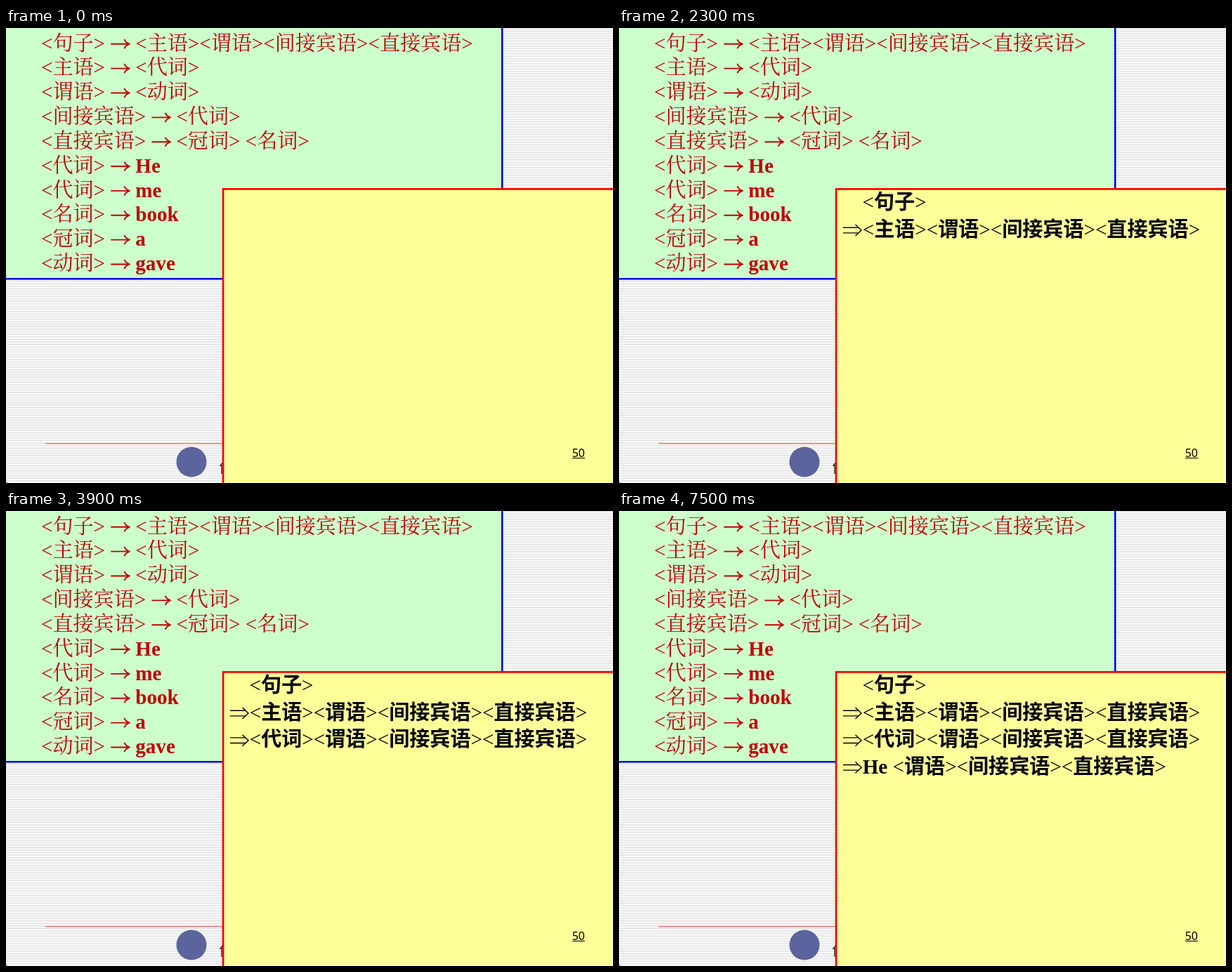
Animation, 864 px wide and 648 px high, one loop 8 s. Source, as an HTML page with a canvas:

```html
<!DOCTYPE html>
<html lang="zh">
<head>
<meta charset="utf-8">
<style>
html, body { margin: 0; width: 100%; height: 100%; overflow: hidden; }
canvas { display: block; }
</style>
</head>
<body>
<canvas width="864" height="648"></canvas>
<script>
const ctx = document.querySelector('canvas').getContext('2d');
const LOOP = 8000, STEP = 100, SIZE = 29.1, ARROW = SIZE * 0.987, SOFT = 0.15;
const SERIF = '"Liberation Serif", "Times New Roman", serif';
const SONG = '"Noto Serif CJK SC", "Noto Sans CJK SC", serif';
const HEI = '"Noto Sans CJK SC", "Noto Sans CJK", sans-serif';

const rules = [
  '<句子> → <主语><谓语><间接宾语><直接宾语>',
  '<主语> → <代词>',
  '<谓语> → <动词>',
  '<间接宾语> → <代词>',
  '<直接宾语> → <冠词> <名词>',
  '<代词> → He',
  '<代词> → me',
  '<名词> → book',
  '<冠词> → a',
  '<动词> → gave'
];
const derivation = [
  { text: '<句子>', x: 346.5, width: 91, start: 900, time: 600 },
  { text: '⇒<主语><谓语><间接宾语><直接宾语>', x: 318, width: 508, start: 1500, time: 800 },
  { text: '⇒<代词><谓语><间接宾语><直接宾语>', x: 318, width: 508, start: 3100, time: 800 },
  { text: '⇒He <谓语><间接宾语><直接宾语>', x: 318, width: 459, start: 6700, time: 800 }
];

function rect(color, x, y, w, h) {
  ctx.fillStyle = color;
  ctx.fillRect(x, y, w, h);
}

function stroke(width, ...lines) {
  ctx.lineWidth = width;
  ctx.beginPath();
  for (const [start, ...rest] of lines) {
    ctx.moveTo(...start);
    for (const point of rest) ctx.lineTo(...point);
  }
  ctx.stroke();
}

function arrow(x, y, double) {
  if (double) {
    stroke(1.4, [[x + 1, y - 3.8], [x + 23, y - 3.8]], [[x + 1, y + 3.8], [x + 23, y + 3.8]],
      [[x + 18.5, y - 8], [x + 27, y], [x + 18.5, y + 8]]);
  } else {
    stroke(1.9, [[x + 1, y], [x + 27, y]], [[x + 20, y - 6.5], [x + 22.5, y - 2.8], [x + 27.3, y],
      [x + 22.5, y + 2.8], [x + 20, y + 6.5]]);
  }
}

// Latin words are bold; brackets stay regular; Chinese takes its own face.
function write(text, x, y, paint, face) {
  ctx.fillStyle = ctx.strokeStyle = paint;
  for (const run of text.match(/[a-z]+|[\u4e00-\u9fff]+|[→⇒]|[<> ]+/gi)) {
    if (/[→⇒]/.test(run)) {
      arrow(x, y - 8.7, run === '⇒');
      x += ARROW;
      continue;
    }
    ctx.font = /[\u4e00-\u9fff]/.test(run) ? face
      : `${/[a-z]/i.test(run) ? 'bold ' : ''}${SIZE}px ${SERIF}`;
    ctx.fillText(run, x, y);
    x += ctx.measureText(run).width;
  }
}

function wipe(x, width, progress) {
  const soft = width * SOFT, edge = x + progress * (width + soft);
  const paint = ctx.createLinearGradient(edge - soft, 0, edge, 0);
  paint.addColorStop(0, '#000');
  paint.addColorStop(1, '#0000');
  return paint;
}

function drawSlide() {
  rect('#f9f9f9', 0, 0, 864, 648);
  for (let y = 0; y < 648; y += 3.6) rect('#dedede', 0, y, 864, 1.2);

  rect('#00f', 0, 0, 707.5, 358.5);
  rect('#cfc', 0, 0, 705, 356);
  rules.forEach((rule, i) =>
    write(rule, 50, 31.5 + i * 34.85, '#c00000', `500 ${SIZE}px ${SONG}`));

  rect('#e57373', 56, 591, 254, 1.4);
  ctx.fillStyle = '#5b649c';
  ctx.beginPath();
  ctx.arc(264, 618, 21.5, 0, 7);
  ctx.fill();
  ctx.strokeStyle = '#222';
  stroke(1.4, [[310, 617], [304.5, 624]], [[307, 622], [307, 635]]);
  ctx.fillStyle = '#888';
  ctx.beginPath();
  ctx.moveTo(0, 644);
  ctx.quadraticCurveTo(0, 648, 4, 648);
  ctx.lineTo(0, 648);
  ctx.fill();

  rect('#f00', 307.7, 228, 557, 420);
  rect('#ff9', 310.4, 230.7, 554, 418);
  ctx.fillStyle = '#000';
  ctx.font = '16px "Noto Sans", "Open Sans", sans-serif';
  ctx.fillText('50', 805.7, 611);
  rect('#000', 806, 612, 18, 1);
}

function frame(now) {
  const t = Math.floor(now % LOOP / STEP) * STEP;
  drawSlide();
  derivation.forEach(({ text, x, width, start, time }, i) => {
    if (t < start) return;
    const progress = Math.min(1, (t - start + STEP / 2) / time);
    write(text, x, 258.2 + i * 38.6, wipe(x, width, progress), `bold ${SIZE}px ${HEI}`);
  });
  requestAnimationFrame(frame);
}

frame(0);
</script>
</body>
</html>
```
